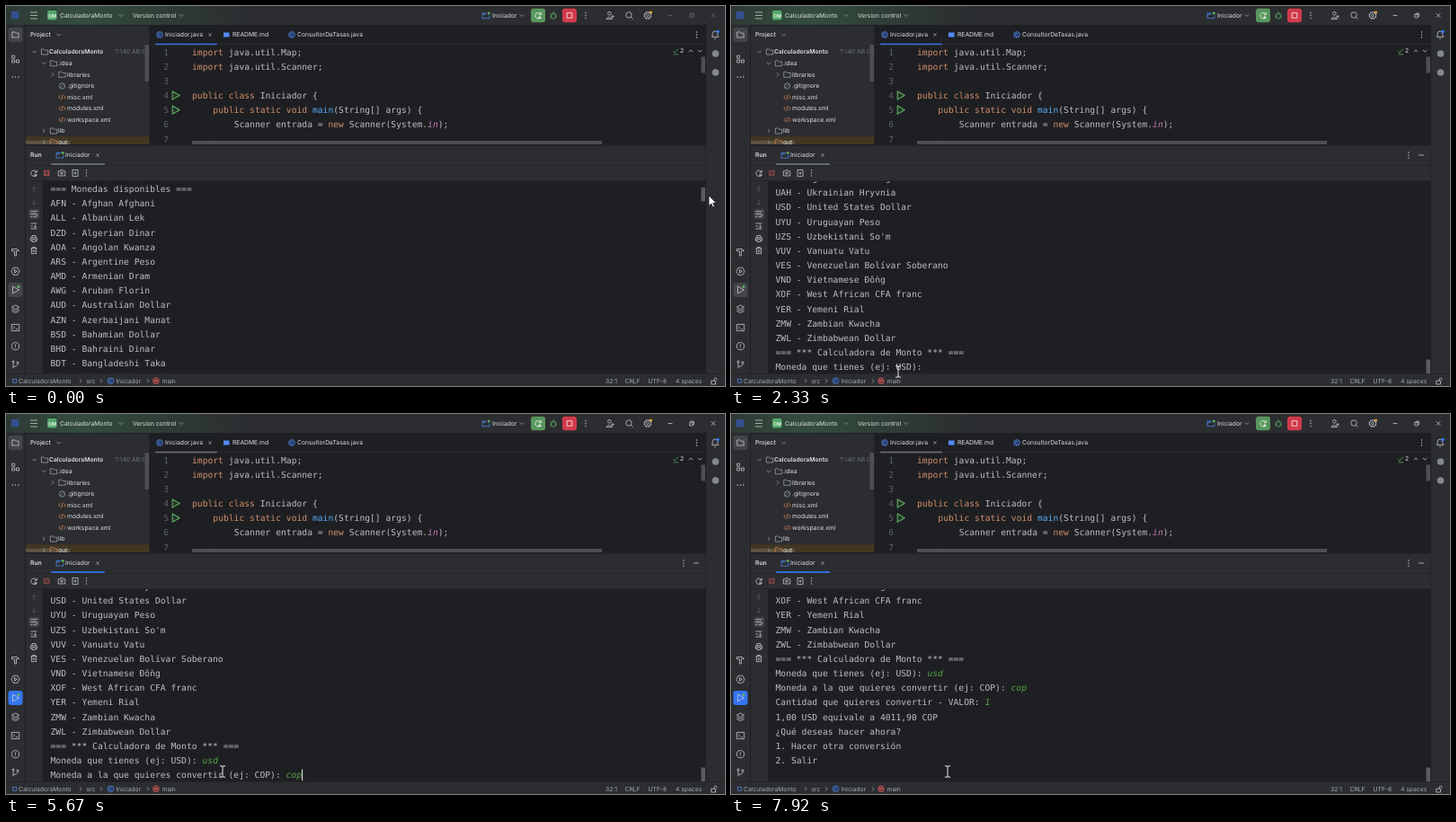
Animation, 800 px wide and 423 px high, one loop 8 s. Source, as an HTML page:

```html
<!DOCTYPE html>
<html lang="es">
<head>
<meta charset="utf-8">
<title>Consola</title>
<style>
html, body { margin: 0; width: 100%; height: 100%; overflow: hidden; background: #1e1f22; }
svg { display: block; width: 100vw; height: 100vh; }
text { white-space: pre; text-rendering: geometricPrecision; font: 6.77px Inter, sans-serif; }
.m { font: 9.685px "DejaVu Sans Mono", monospace; fill: #bcbec4; }
.in { font-style: italic; fill: #57a64a; }
</style>
</head>
<body>
<svg id="stage" viewBox="0 0 800 423" preserveAspectRatio="none"></svg>
<script>
const ROW = 16.17, COL = 5.83, LEFT = 49.5, TOP = 203.5;
const APP = "CalculadoraMonto", CLS = "Iniciador";
const PANEL = "#2b2d30", DARK = "#1e1f22", INK = "#ced0d6", FG = "#dfe1e5", DIM = "#a0a4ab", BLUE = "#3574f0", GREY = "#6f737a", BAR = "#4d4f52";

const money = `AFN Afghan Afghani|ALL Albanian Lek|DZD Algerian Dinar|AOA Angolan Kwanza|ARS Argentine Peso|AMD Armenian Dram|AWG Aruban Florin|AUD Australian Dollar|AZN Azerbaijani Manat|BSD Bahamian Dollar|BHD Bahraini Dinar|BDT Bangladeshi Taka|BBD Barbados Dollar|BYN Belarusian Ruble|BZD Belize Dollar|BMD Bermudian Dollar|BTN Bhutanese Ngultrum|BOB Bolivian Boliviano|BAM Bosnia and Herzegovina Mark|BWP Botswana Pula|BRL Brazilian Real|BND Brunei Dollar|BGN Bulgarian Lev|BIF Burundian Franc|XPF CFP Franc|KHR Cambodian Riel|CAD Canadian Dollar|CVE Cape Verdean Escudo|KYD Cayman Islands Dollar|XAF Central African CFA Franc|CLP Chilean Peso|CNY Chinese Renminbi|COP Colombian Peso|KMF Comorian Franc|CDF Congolese Franc|CRC Costa Rican Colon|HRK Croatian Kuna|CUP Cuban Peso|CZK Czech Koruna|DKK Danish Krone|DJF Djiboutian Franc|DOP Dominican Peso|XCD East Caribbean Dollar|EGP Egyptian Pound|ERN Eritrean Nakfa|ETB Ethiopian Birr|EUR Euro|FKP Falkland Islands Pound|FOK Faroese Króna|FJD Fiji Dollar|GMD Gambian Dalasi|GEL Georgian Lari|GHS Ghanaian Cedi|GIP Gibraltar Pound|GTQ Guatemalan Quetzal|GGP Guernsey Pound|GNF Guinean Franc|GYD Guyanese Dollar|HTG Haitian Gourde|HNL Honduran Lempira|HKD Hong Kong Dollar|HUF Hungarian Forint|ISK Icelandic Króna|INR Indian Rupee|IDR Indonesian Rupiah|IRR Iranian Rial|IQD Iraqi Dinar|ILS Israeli New Shekel|JMD Jamaican Dollar|JPY Japanese Yen|JEP Jersey Pound|JOD Jordanian Dinar|KZT Kazakhstani Tenge|KES Kenyan Shilling|KID Kiribati Dollar|KWD Kuwaiti Dinar|KGS Kyrgyzstani Som|LAK Lao Kip|LBP Lebanese Pound|LSL Lesotho Loti|LRD Liberian Dollar|LYD Libyan Dinar|MOP Macanese Pataca|MKD Macedonian Denar|MGA Malagasy Ariary|MWK Malawian Kwacha|MYR Malaysian Ringgit|MVR Maldivian Rufiyaa|IMP Manx Pound|MRU Mauritanian Ouguiya|MUR Mauritian Rupee|MXN Mexican Peso|MDL Moldovan Leu|MNT Mongolian Tögrög|MAD Moroccan Dirham|MZN Mozambican Metical|MMK Myanmar Kyat|NAD Namibian Dollar|NPR Nepalese Rupee|ANG Netherlands Antillian Guilder|TWD New Taiwan Dollar|NZD New Zealand Dollar|NIO Nicaraguan Córdoba|NGN Nigerian Naira|NOK Norwegian Krone|OMR Omani Rial|PKR Pakistani Rupee|PAB Panamanian Balboa|PGK Papua New Guinean Kina|PYG Paraguayan Guaraní|PEN Peruvian Sol|PHP Philippine Peso|PLN Polish Złoty|GBP Pound Sterling|QAR Qatari Riyal|RON Romanian Leu|RUB Russian Ruble|RWF Rwandan Franc|SHP Saint Helena Pound|WST Samoan Tālā|SAR Saudi Riyal|RSD Serbian Dinar|SCR Seychellois Rupee|SLE Sierra Leonean Leone|SGD Singapore Dollar|SBD Solomon Islands Dollar|SOS Somali Shilling|ZAR South African Rand|KRW South Korean Won|SSP South Sudanese Pound|XDR Special Drawing Rights|LKR Sri Lanka Rupee|SDG Sudanese Pound|SRD Surinamese Dollar|SEK Swedish Krona|CHF Swiss Franc|SYP Syrian Pound|STN São Tomé and Príncipe Dobra|TJS Tajikistani Somoni|TZS Tanzanian Shilling|THB Thai Baht|TOP Tongan Paʻanga|TTD Trinidad and Tobago Dollar|TND Tunisian Dinar|TRY Turkish Lira|TMT Turkmenistan Manat|TVD Tuvaluan Dollar|AED UAE Dirham|UGX Ugandan Shilling|UAH Ukrainian Hryvnia|USD United States Dollar|UYU Uruguayan Peso|UZS Uzbekistani So'm|VUV Vanuatu Vatu|VES Venezuelan Bolívar Soberano|VND Vietnamese Đồng|XOF West African CFA franc|YER Yemeni Rial|ZMW Zambian Kwacha|ZWL Zimbabwean Dollar`.split("|");

// Console rows: text, time shown, typed answer, time of its first key
const KEY = 165;
const rows = [["=== Monedas disponibles ===", 0],
  ...money.map(s => [s.slice(0, 3) + " - " + s.slice(4), 0]),
  ["=== *** Calculadora de Monto *** ===", 0],
  ["Moneda que tienes (ej: USD): ", 0, "usd", 4000],
  ["Moneda a la que quieres convertir (ej: COP): ", 5000, "cop", 5170],
  ["Cantidad que quieres convertir - VALOR: ", 6000, "1", 6670],
  ["1,00 USD equivale a 4011,90 COP", 7670],
  ["¿Qué deseas hacer ahora?", 7670],
  ["1. Hacer otra conversión", 7670],
  ["2. Salir", 7670]];
const ask = money.length + 2;
const sri = 1 + money.findIndex(s => s.startsWith("LKR"));
const FIT = 12.26, END = ask - FIT, FOCUS = 2750;
const keys = [FOCUS, 4000, 4165, 4330, 5170, 5335, 5500, 6000, 6670, 7170];

// Static drawing helpers
const rect = (x, y, w, h, fill, r = 0, more = "") => `<rect x="${x}" y="${y}" width="${w}" height="${h}" fill="${fill}" rx="${r}" ${more}/>`;
const text = (x, y, s, fill = FG, more = "") => `<text x="${x}" y="${y + 2.45}" fill="${fill}" ${more}>${s}</text>`;
const mono = (x, y, s, more = "") => `<text class="m" x="${x}" y="${y + 3.5}" ${more}>${s}</text>`;
const icon = (x, y, d, c = INK, more = "") => `<path transform="translate(${x} ${y})" d="${d}" fill="none" stroke="${c}" stroke-width=".75" stroke-linejoin="round" ${more}/>`;
const dot = (x, y, r, c) => `<circle cx="${x}" cy="${y}" r="${r}" fill="${c}"/>`;
const ring = r => `M${-r} 0a${r} ${r} 0 1 0 ${2 * r} 0a${r} ${r} 0 1 0 ${-2 * r} 0`;
const down = (x, y, c = DIM) => icon(x, y, "M-2.2 -1.1L0 1.1 2.2 -1.1", c);
const right = (x, y, c = DIM) => icon(x, y, "M-1.1 -2.2L1.1 0 -1.1 2.2", c);
const cross = (x, y, c = DIM, k = 1.7) => icon(x, y, `M${-k} ${-k}L${k} ${k}M${k} ${-k}L${-k} ${k}`, c);
const dots = (x, y) => [-3, 0, 3].map(d => dot(x, y + d, .7, INK)).join("");
const FOLDER = "M-3.7 -3H-.8L.4 -1.8H3.7V3H-3.7Z", PLAY = "M-3 -4L4 0 -3 4Z";
const RERUN = "M3 -1A3.2 3.2 0 1 0 3 1.5M3.3 -3.5V-.8H.7M1 1L3.5 2.4 1 3.8Z";
const folder = (x, y) => icon(x, y, FOLDER, DIM);
const classIcon = (x, y) => icon(x, y, ring(3.4), "#548af7", 'style="fill:#25324d"') + icon(x, y, "M1.3 -1A1.6 1.6 0 1 0 1.3 1", "#548af7");
const appIcon = (x, y) => icon(x, y, "M1 -2.6H-4V3.2H4V0M-4 -1H0", "#548af7") + dot(x + 3.2, y - 2.6, 1.5, "#5fad65");
const kw = s => `<tspan fill="#cf8e6d">${s}</tspan>`;

function titleBar() {
  return rect(0, 0, 800, 21, PANEL) + rect(0, 0, 270, 21, "url(#green)") +
    rect(6, 6, 8.5, 8.5, "#33508f") + icon(31, 10.5, "M-4 -3.5H4M-4 0H4M-4 3.5H4") +
    rect(46, 5, 10.5, 10.5, "#55a76a", 2) + text(47.2, 10.3, "CM", "#fff", 'style="font-size:5.3px;font-weight:600"') +
    text(60, 10.5, APP) + down(128, 10.5) + text(141, 10.5, "Version control") + down(195, 10.5) +
    appIcon(534, 10.5) + text(541, 10.5, CLS) + down(574, 10.5) +
    rect(584, 2.8, 16, 15.5, "#57965c", 3) + icon(592, 10.5, RERUN, "#fff") +
    icon(609, 10.8, "M-2 -.6A2 2 0 0 1 2 -.6V1.6A2 2 0 0 1 -2 1.6ZM-1.3 -2.3A1.3 1.3 0 0 1 1.3 -2.3M-3.8 -2L-2 -.6M3.8 -2L2 -.6M-4 .6H-2M4 .6H2M-3.6 3.2L-2 1.8M3.6 3.2L2 1.8", "#5fad65") +
    rect(619, 2.8, 16, 15.5, "#d13b4b", 3) + icon(627, 10.5, "M-2.8 -2.8H2.8V2.8H-2.8Z", "#fff") + dots(645, 10.5) +
    icon(672, 10.5, "M-2.4 -2.2a1.8 1.8 0 1 0 3.6 0a1.8 1.8 0 1 0 -3.6 0M-4 4A3.5 3 0 0 1 2.5 4ZM3 -.5V3M1.3 1.2H4.8") +
    icon(693, 10, ring(3.2) + "M2.3 2.3L4.6 4.6") + icon(714, 10.5, ring(1.4) + ring(3.6)) +
    icon(714, 10.5, ring(3.9), INK, 'stroke-dasharray="1.6 1.5"') + dot(717.5, 7, 1.6, "#e0a33a") +
    `<g id="winButtons">` + icon(739, 10.5, "M-2.5 0H2.5") + icon(763, 10.5, "M-2.3 -1H1.2V2.4H-2.3ZM-1 -1V-2.4H2.4V1.2H1.2") + cross(787, 10.5, INK, 2.3) + "</g>";
}

function sideBars() {
  return rect(0, 21, 21, 388, PANEL) + rect(779, 21, 21, 388, PANEL) +
    rect(2.5, 24, 16, 16, "#43454a", 3) + icon(10.5, 32, FOLDER) +
    icon(10.5, 59, "M-3.8 -3.8H-.8V-.8H-3.8ZM-3.8 1H-.8V4H-3.8ZM1 1H4V4H1Z") + [-3.3, 0, 3.3].map(d => dot(10.5 + d, 79, .7, INK)).join("") +
    icon(10.5, 274, "M-4 -3.5H2L4 -1.5H1V4H-1V-1.2H-4Z") +
    icon(10.5, 295.3, "M-2.4 -4H2.4L4.6 0 2.4 4H-2.4L-4.6 0ZM-1 -1.8L2 0 -1 1.8Z") +
    rect(2.5, 308, 16, 16, "#43454a", 3, 'id="runBox"') + icon(10.5, 316, PLAY) + dot(14, 312.5, 1.6, "#5fad65") +
    icon(10.5, 337, "M0 -4L4.2 -1.8 0 .4 -4.2 -1.8ZM-4.2 .3L0 2.5 4.2 .3M-4.2 2.4L0 4.6 4.2 2.4") +
    icon(10.5, 358, "M-4.2 -3.6H4.2V3.6H-4.2ZM-2.5 -1.5L-1 0 -2.5 1.5M.3 1.7H2.6") +
    icon(10.5, 378.7, ring(4.1) + "M0 -2.2V.5M0 1.5V2.3") +
    icon(10.5, 399, "M-3.6 -3a1.1 1.1 0 1 0 2.2 0a1.1 1.1 0 1 0 -2.2 0M1.4 -2a1.1 1.1 0 1 0 2.2 0a1.1 1.1 0 1 0 -2.2 0M-2.5 -1.8V4.4M-2.5 2.4Q2.5 2.4 2.5 -.8") +
    icon(789, 32, "M-3.8 2.4L-2.8 .8V-1.2A2.8 2.8 0 0 1 2.8 -1.2V.8L3.8 2.4ZM-1 4.2H1") + dot(792, 28.5, 1.8, BLUE) +
    dot(789.5, 53, 3.8, "#85888e") + dot(789.5, 74, 3.8, "#85888e");
}

function project() {
  const file = (y, s) => icon(62.5, y, "M-1.6 -2L-3.8 0 -1.6 2M1.6 -2L3.8 0 1.6 2M.6 -2.8L-.6 2.8", "#e08855") + text(68, y, s);
  return rect(22, 22, 137.5, 132, PANEL) + `<g clip-path="url(#tree)">` + rect(22, 145.3, 137.5, 9, "#423723") + rect(22, 150, 49, 4, "#5d5340") +
    text(27, 32, "Project", FG, 'style="font-weight:500"') + down(58.5, 32) +
    down(31.5, 51) + folder(43, 51) + text(48, 51, APP, FG, 'style="font-weight:600"') + text(121, 51, "T:\\40 AB CD", GREY) +
    down(42, 63.8) + folder(53, 63.8) + text(58, 63.8, ".idea") +
    right(52, 76.3) + folder(62.5, 76.3) + text(68, 76.3, "libraries") +
    icon(62.5, 89, ring(3.2) + "M-2.2 2.2L2.2 -2.2", DIM) + text(68, 89, ".gitignore") +
    file(101.5, "misc.xml") + file(114, "modules.xml") + file(126.6, "workspace.xml") +
    right(42, 139) + folder(53, 139) + text(58, 139, "lib") +
    right(42, 151.5) + icon(53, 151.5, FOLDER, "#c77d55") + text(58, 151.5, "out") +
    rect(154.5, 43, 4.5, 41, BAR) + "</g>";
}

function editor() {
  const y = n => 51 + (n - 1) * ROW, run = n => icon(189, y(n), "M-3.8 -4.6L4.2 0 -3.8 4.6Z", "#5fad65", 'style="fill:#253627;stroke-width:1.1"');
  const code = [[0, kw("import") + " java.util.Map;"], [0, kw("import") + " java.util.Scanner;"], [0, ""],
    [0, kw("public class") + " " + CLS + " {"],
    [4, kw("public static void") + ' <tspan fill="#56a8f5">main</tspan>(String[] args) {'],
    [8, "Scanner entrada = " + kw("new") + ' Scanner(System.<tspan fill="#c77dbb" font-style="italic">in</tspan>);'], [0, ""]];
  return rect(160.5, 22, 618, 132, DARK) + rect(160.5, 42.4, 618, .5, "#393b40") +
    classIcon(171, 32) + text(177, 32, CLS + ".java") + cross(227, 32) + rect(166, 41.8, 69, 1.4, BLUE, .7, 'id="fileLine"') +
    rect(242, 29.5, 6.5, 5, "#548af7") + text(252, 32, "README.md") + classIcon(318, 32) + text(324, 32, "ConsultorDeTasas.java") + dots(768.5, 32) +
    rect(230.3, 124, .5, 26, "#292b2e") +
    code.map(([n, s], i) => mono(181, y(i + 1), i + 1, 'text-anchor="end" style="fill:#5a5f68"') + mono(207 + n * COL, y(i + 1), s)).join("") +
    run(4) + run(5) + icon(745, 50, "M-3 0L-1 2.2 3 -2.4M-2.5 3.8H3", "#5fad65") + text(750, 50, "2") +
    icon(762, 50, "M-2.2 1.1L0 -1.1 2.2 1.1") + down(772, 50, INK) +
    rect(207, 150, 456, 4, BAR) + rect(773.5, 56.5, 4.5, 18, BAR);
}

function runPanel() {
  const tool = (y, d, c = DIM) => icon(31, y, d, c);
  return rect(22, 155.5, 756.5, 21.5, PANEL) + rect(22, 177.6, 756.5, 16.8, PANEL) + rect(22, 195, 19, 214, PANEL) +
    text(27, 166, "Run", FG, 'style="font-weight:600"') + appIcon(60, 166) + text(66, 166, CLS) + cross(102, 166) +
    rect(50, 175.2, 60, 1.8, GREY, .8, 'id="runLine"') +
    `<g id="panelButtons">` + dots(754, 166) + icon(768, 166, "M-3 0H3") + "</g>" +
    icon(31, 186, RERUN) + icon(45.3, 186, "M-2.7 -2.7H2.7V2.7H-2.7Z", "#db5c5c", 'style="fill:#5e3838" id="stop"') +
    icon(62, 186, "M-3.8 -2.2H-1.8L-1 -3.4H1L1.8 -2.2H3.8V3H-3.8Z" + ring(1.3)) +
    icon(77, 186, "M-3 -3.6H3V3.6H-3ZM-1.3 0H1.3M0 -1.5V1.5") + dots(89.5, 186) +
    tool(204, "M0 3V-3M-2.2 -1L0 -3 2.2 -1", "#5a5d63") + tool(218, "M0 -3V3M-2.2 1L0 3 2.2 1", "#5a5d63") +
    rect(25.5, 226, 11.5, 11, "#43454a", 2) + tool(231.5, "M-3.5 -2.7H3.5M-3.5 0H2A1.4 1.4 0 0 1 2 2.8H0M-3.5 2.8H-1.5", INK) +
    tool(245, "M-3.5 -3H3.5M-3.5 3H3.5M-3.5 0H-1M1.5 -1.5V1.8M0 .5L1.5 2 3 .5", INK) +
    tool(259, "M-2 -1V-3.4H2V-1M-2 2H-3.6V-1H3.6V2H2M-2 .8H2V3.4H-2Z", INK) +
    tool(272, "M-3.4 -2.4H3.4M-1.2 -2.4V-3.6H1.2V-2.4M-2.6 -2.4V3.6H2.6V-2.4M-.8 -.6V2M.8 -.6V2", INK) +
    `<g clip-path="url(#console)"><g id="scroll">` +
    rows.map((r, i) => mono(LEFT, i * ROW, `${r[0]}<tspan class="in"></tspan>`)).join("") +
    rect(0, 0, 1.1, 12.5, FG, 0, 'id="caret"') + "</g></g>" + rect(773.5, 0, 4.5, 15.5, "#5a5c5f", 0, 'id="thumb"');
}

function statusBar() {
  const t = (x, s) => text(x, 417.3, s, "#a8adb5");
  return rect(0, 409.6, 800, 13.4, PANEL) + icon(9.5, 417.3, "M-2 -2H2V2H-2Z", "#548af7") + t(14, APP) + right(83, 417.3) + t(89.5, "src") +
    right(106, 417.3) + classIcon(116.5, 417.3) + t(122.5, CLS) + right(158, 417.3) +
    icon(167, 417.3, ring(3.4), "#db5c5c", 'style="fill:#5e3838"') +
    icon(167, 417.3, "M-1.6 1.4V-1.2M-1.6 -.8Q0 -1.8 0 1.4M0 -.8Q1.6 -1.8 1.6 1.4", "#db5c5c") + t(173.5, "main") +
    t(667, "32:1") + t(688.5, "CRLF") + t(714.5, "UTF-8") + t(745, "4 spaces") +
    icon(787.5, 418, "M-2.8 -.8H2V3H-2.8ZM.5 -.8V-2.4A1.5 1.5 0 0 1 3.5 -2.4V-1.6");
}

const stage = document.getElementById("stage");
stage.innerHTML = `<defs>
  <linearGradient id="green"><stop stop-color="#35553f" stop-opacity=".3"/><stop offset=".3" stop-color="#35553f" stop-opacity=".8"/><stop offset="1" stop-color="#35553f" stop-opacity="0"/></linearGradient>
  <clipPath id="tree">${rect(22, 22, 137.5, 132, "#000")}</clipPath>
  <clipPath id="console">${rect(42, 195, 736, 214, "#000")}</clipPath></defs>` +
  rect(0, 0, 800, 423, DARK) + titleBar() + sideBars() + project() + editor() + runPanel() + statusBar() +
  `<path id="arrow" d="M0 0V11.5L2.7 9 4.5 13 6.4 12.2 4.6 8.3H8.2Z" fill="#fff" stroke="#111" stroke-width=".7"/>
   <path id="beam" d="M-3 -6.2H-1Q0 -6.2 0 -5V5Q0 6.2 -1 6.2H-3M3 -6.2H1Q0 -6.2 0 -5M0 5Q0 6.2 1 6.2H3" fill="none" stroke="#f4f4f4" stroke-width=".95"/>`;

const el = Object.fromEntries([...stage.querySelectorAll("[id]")].map(e => [e.id, e]));
const lines = [...el.scroll.querySelectorAll("text")];
const set = (e, o) => { for (const k in o) e.setAttribute(k, o[k]); };

// Linear track through [time, value, ...] points
function track(points, t) {
  const i = points.findIndex(p => p[0] > t);
  if (i < 0) return points[points.length - 1].slice(1);
  const a = points[i - 1], b = points[i], u = (t - a[0]) / (b[0] - a[0]);
  return a.slice(1).map((v, k) => v + (b[k + 1] - v) * u);
}
const drag = [[0, 0], [80, 0], [1080, sri + .31], [1670, END]];
const mouse = [[0, 782, 211], [80, 782, 211], [800, 808, 340], [1550, 808, 395], [1830, 186, 407], [2400, 186, 407], [FOCUS, 241, 398]];
const typed = (r, t) => r[2] ? r[2].slice(0, Math.max(0, Math.floor((t - r[3]) / KEY) + 1)) : "";

function draw(t) {
  const last = ask + (t >= 5000) + (t >= 6000) + (t >= 7170) + (t >= 7670) * 4;
  const top = t < 1670 ? track(drag, t)[0] : last - FIT;
  set(el.scroll, { transform: `translate(0 ${TOP - top * ROW})` });
  set(el.thumb, { y: 202 + 191.5 * Math.min(1, top / END) });
  for (let i = ask; i < rows.length; i++) {
    lines[i].style.display = t >= rows[i][1] ? "" : "none";
    lines[i].lastChild.textContent = typed(rows[i], t);
  }
  const focus = t >= FOCUS, row = rows[last];
  const col = row && t >= row[1] ? row[0].length + typed(row, t).length : 0;
  const since = t - Math.max(...keys.filter(k => k <= t));
  set(el.caret, { x: LEFT + col * COL - .3, y: last * ROW - 6.3, opacity: focus && since % 1060 < 530 ? 1 : 0 });
  set(el.runBox, { fill: focus ? BLUE : "#43454a" });
  set(el.runLine, { fill: focus ? BLUE : GREY });
  set(el.fileLine, { fill: focus ? GREY : BLUE });

  const fade = Math.min(1, Math.max(0, (t - 80) / 800));
  set(el.winButtons, { opacity: .35 + .65 * fade });
  set(el.stop, { opacity: 1 - .25 * fade });
  set(el.panelButtons, { opacity: Math.min(1, t / 2100) });
  const [x, y] = track(mouse, t), edge = x > 772;
  set(el.arrow, { transform: `translate(${x} ${y})`, opacity: +edge });
  set(el.beam, { transform: `translate(${x} ${y})`, opacity: +!edge });
}

const start = performance.now();
function tick() {
  draw((performance.now() - start) % 8000);
  requestAnimationFrame(tick);
}
tick();
</script>
</body>
</html>
```
